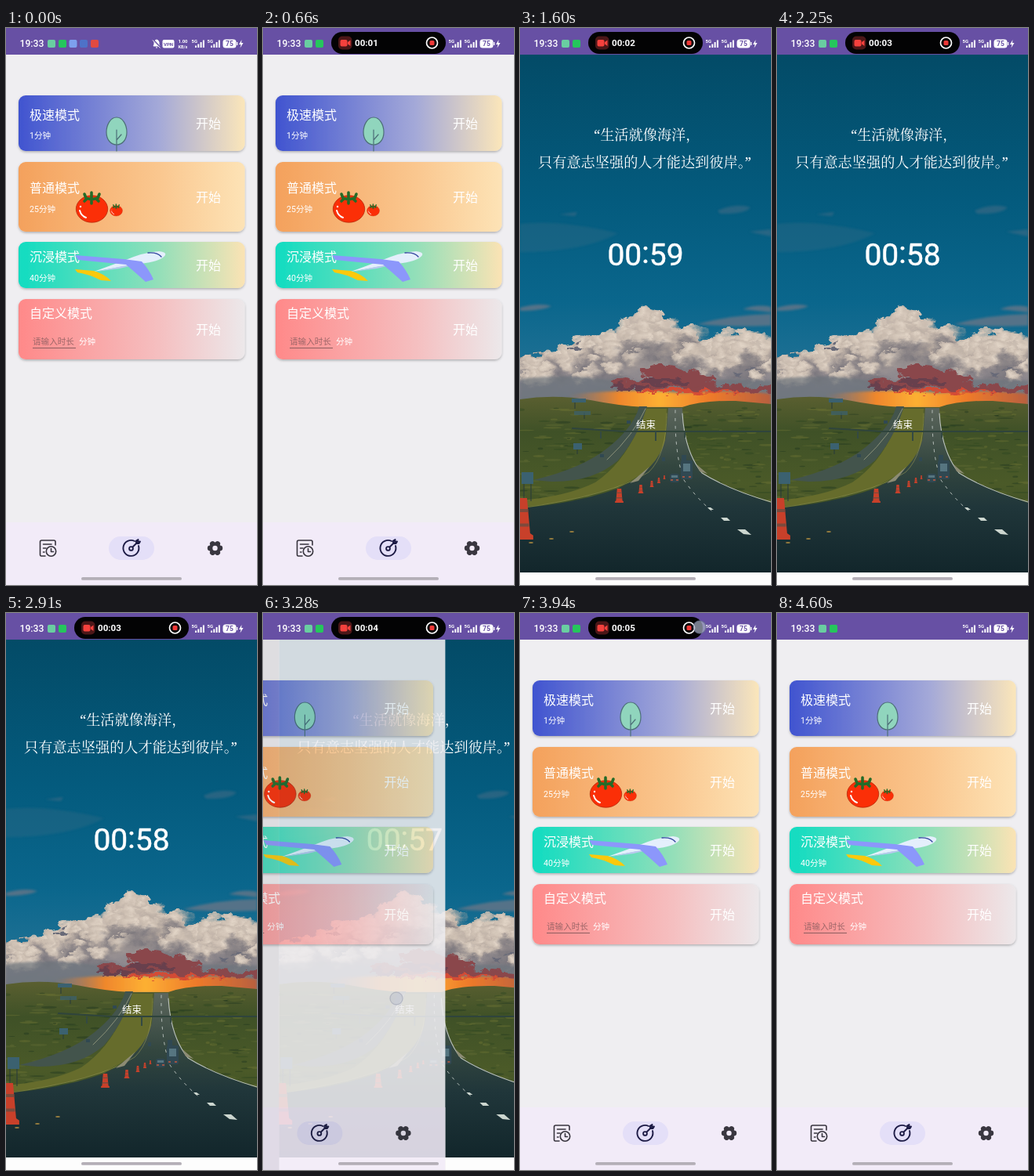
Recreate the animation shown at these times as an HTML page. Size 320 by 711 pixels, loop 4700 ms.

```html
<!DOCTYPE html>
<html lang="zh-CN">
<head>
<meta charset="utf-8">
<title>专注计时</title>
<style>
  html, body { margin: 0; width: 100%; height: 100%; overflow: hidden; background: #efeef1; }
  svg { display: block; width: 100vw; height: 100vh; }
  text { font-family: Roboto, "Noto Sans CJK SC", "Noto Sans CJK", sans-serif; fill: #fff; }
  .title { font-size: 16px; font-weight: 500; }
  .sub { font-size: 10.6px; }
  .quote { font-family: "Noto Serif", "Noto Serif CJK SC", "Noto Sans CJK SC", serif; font-size: 18.2px; font-weight: 300; }
  .tiny { font-size: 6px; font-weight: 700; }
  .line { fill: none; stroke-linecap: round; stroke-linejoin: round; }
</style>
</head>
<body>
<svg viewBox="0 0 320 711" preserveAspectRatio="none">
  <defs>
    <linearGradient id="sky" x1="0" y1="0" x2="0" y2="1">
      <stop offset="0" stop-color="#034b67"/><stop offset=".42" stop-color="#045b7e"/>
      <stop offset=".7" stop-color="#0a668c"/><stop offset="1" stop-color="#2b7799"/>
    </linearGradient>
    <linearGradient id="land" x1="0" y1="0" x2="0" y2="1">
      <stop offset="0" stop-color="#5a5f30"/><stop offset=".2" stop-color="#3f5127"/>
      <stop offset=".5" stop-color="#4b5a28"/><stop offset=".7" stop-color="#3b4d25"/>
      <stop offset="1" stop-color="#18302a"/>
    </linearGradient>
    <linearGradient id="road" x1="0" y1="0" x2="0" y2="1">
      <stop offset="0" stop-color="#5c665c"/><stop offset=".35" stop-color="#33463f"/>
      <stop offset=".6" stop-color="#20363a"/><stop offset="1" stop-color="#12262b"/>
    </linearGradient>
    <linearGradient id="glow" x1="0" y1="0" x2="1" y2="0">
      <stop offset="0" stop-color="#c9783e" stop-opacity="0"/><stop offset=".25" stop-color="#f0872c"/>
      <stop offset=".45" stop-color="#fdb033"/><stop offset=".7" stop-color="#ee7a2a"/>
      <stop offset="1" stop-color="#b8603f"/>
    </linearGradient>
    <linearGradient id="mass" x1="0" y1="0" x2="0" y2="1">
      <stop offset="0" stop-color="#d6c8bb"/><stop offset=".4" stop-color="#b4a69c"/>
      <stop offset=".75" stop-color="#84818a"/><stop offset="1" stop-color="#6f757f"/>
    </linearGradient>
    <radialGradient id="puff" cx=".4" cy=".3" r=".6">
      <stop offset="0" stop-color="#e2d5c7"/><stop offset=".5" stop-color="#cbbdb0" stop-opacity=".85"/>
      <stop offset="1" stop-color="#a89d98" stop-opacity="0"/>
    </radialGradient>
    <radialGradient id="shade">
      <stop offset="0" stop-color="#77737a" stop-opacity=".9"/><stop offset="1" stop-color="#817d82" stop-opacity="0"/>
    </radialGradient>
    <filter id="soft" x="-10%" y="-40%" width="120%" height="180%"><feGaussianBlur stdDeviation="1.6"/></filter>
    <filter id="rough" x="-5%" y="-20%" width="110%" height="140%">
      <feTurbulence type="fractalNoise" baseFrequency=".06 .09" numOctaves="4" seed="4"/>
      <feDisplacementMap in="SourceGraphic" scale="20" xChannelSelector="R" yChannelSelector="G"/>
    </filter>
    <filter id="drop" x="-5%" y="-10%" width="110%" height="130%">
      <feDropShadow dx="0" dy="1.5" stdDeviation="1.6" flood-color="#000" flood-opacity=".27"/>
    </filter>
    <clipPath id="page"><rect id="pageClip" width="320" height="711"/></clipPath>
  </defs>

  <rect width="320" height="711" fill="#60646a"/>

  <g id="home">
    <rect width="320" height="711" fill="#efeef1"/>
    <rect y="631" width="320" height="80" fill="#f2ebf8"/>
    <g id="cards"></g>

    <!-- tree -->
    <g stroke="#4d6f78" stroke-width="1.2" class="line">
      <path d="M141 114C149 114 154 124 154 133C154 143 148 149 141 149S128 143 128 133C128 124 133 114 141 114Z" fill="#90d5bd"/>
      <path d="M141 130V157M141 143L147 136"/>
    </g>

    <!-- tomatoes -->
    <g id="tomato">
      <ellipse cx="109.5" cy="231" rx="20.2" ry="17.2" fill="#fb2f07" stroke="#b52a0c" stroke-width=".8"/>
      <path d="M100 212L102 217L109 219L117 217L119 212M109 210V224M103 218L100 221M115 218L118 221" class="line" stroke="#246b28" stroke-width="3.600"/>
      <path d="M94 233Q96 240 102 242" class="line" stroke="#fff" stroke-width="2"/>
      <circle cx="95" cy="228" r="1.2" fill="#fff"/>
    </g>
    <use href="#tomato" transform="translate(97.5 142.5) scale(.393)"/>

    <!-- plane -->
    <path d="M88 308L112 310Q126 314 134 323L121 322Q105 314 91 312Z" fill="#fbc90c"/>
    <path d="M112 311L150 297Q176 286 195 285Q205 286 203 290Q198 297 178 300L145 305Z" fill="#e4effc"/>
    <path d="M115 311L148 304L178 299L145 307Z" fill="#b9c9ee"/>
    <path d="M88 290L150 295L173 298Q183 309 188 321L178 324Q166 313 153 302L92 296Z" fill="#8c97fb"/>
    <path d="M181 287Q193 286 198 292" class="line" stroke="#34489f" stroke-width="1.4"/>

    <!-- navigation -->
    <g class="line" stroke="#37343d" stroke-width="1.6">
      <path d="M50 674H45Q43.500 674 43.500 672V656Q43.500 654 45.500 654H61Q63 654 63 656V660M47.500 659H58M47.500 664H51M47.500 669H49"/>
      <circle cx="57.500" cy="668" r="6.200"/><path d="M57.500 664.500V668.500H60.500"/>
    </g>
    <rect x="131" y="649" width="58" height="30" rx="15" fill="#e4dff8"/>
    <g class="line" stroke="#1d1b45" stroke-width="1.9">
      <path d="M164 655A10 10 0 1 0 169 661"/>
      <circle cx="159.500" cy="664.500" r="2.400"/><path d="M161.500 662.500L168 656M166 654.500V658H169.500L171 655.500L168 656L168.500 653Z"/>
    </g>
    <g id="gear" transform="translate(266.5 664)"></g>
  </g>

  <g id="focus">
    <g clip-path="url(#page)">
      <rect width="320" height="711" fill="#fdfdfd"/>
      <rect width="320" height="34" fill="#6750a4"/>
      <rect y="34" width="320" height="450" fill="url(#sky)"/>
      <g filter="url(#soft)" fill="#5d7488">
        <path d="M0 250Q50 244 125 262Q80 286 0 286Z" opacity=".2"/>
        <path d="M252 233Q275 223 294 229Q286 238 255 237ZM292 260L320 257V266ZM50 238L73 235L70 240Z" opacity=".4"/>
        <path d="M0 357Q25 350 40 355Q27 361 0 361ZM226 378Q270 366 320 365V380Q270 382 226 378ZM284 359Q302 352 320 356V363Z" opacity=".9"/>
      </g>
      <g id="clouds" filter="url(#rough)"></g>
      <path d="M0 448Q70 440 130 452Q230 446 320 450V486H0Z" fill="#6d747d" opacity=".7" filter="url(#soft)"/>
      <path d="M62 468Q150 459 205 466Q270 461 320 467V485H62Z" fill="url(#glow)" filter="url(#soft)"/>
      <g filter="url(#rough)">
        <g fill="#8a474b"><ellipse cx="182" cy="440" rx="26" ry="9"/><ellipse cx="212" cy="450" rx="38" ry="9"/><ellipse cx="160" cy="455" rx="40" ry="7"/><ellipse cx="262" cy="460" rx="52" ry="5"/><ellipse cx="308" cy="462" rx="24" ry="5"/></g>
        <g fill="#683f4d"><ellipse cx="185" cy="452" rx="32" ry="4"/><ellipse cx="140" cy="459" rx="26" ry="3"/></g>
        <path d="M150 463Q215 457 290 465Q230 466 150 466Z" fill="#d44c34"/>
        <path d="M60 407Q73 400 82 407Q74 412 60 409ZM268 443L284 440L281 447ZM286 435L303 433L299 438Z" fill="#686b78"/>
      </g>
      <path d="M0 474Q45 467 90 475Q125 482 158 484H207Q232 475 275 476L320 480V695H0Z" fill="url(#land)"/>
      <g id="tufts"></g>
      <path d="M160 486H187L185 530Q174 566 121 587Q60 606 0 612V603Q60 598 96 580Q140 550 160 486Z" fill="#666c2c"/>
      <path d="M152 483H162Q151 521 125 552Q93 580 40 579L17 577Q80 562 113 535Q145 509 152 483Z" fill="#43544c"/>
      <path d="M160 486Q146 518 111 551" class="line" stroke="#8b9179"/>
      <path d="M189 485H207Q208 535 231 567Q265 588 320 606V695H0V613Q70 607 124 588Q176 565 186 523Z" fill="url(#road)"/>
      <path d="M187 492Q187 545 164 567Q117 597 0 613" class="line" stroke="#a5a258" opacity=".5"/>
      <path d="M207 492Q210 541 232 568Q265 589 320 605" class="line" stroke="#bcc3bb" stroke-width="1.1"/>
      <path d="M198 488Q197 544 209 577Q225 600 244 616" class="line" stroke="#bac2bd" stroke-dasharray="3 7"/>
      <path d="M239 612l4 0 4 3-5 0ZM256 625l8 0 4 4-8 0ZM277 640l10 0 8 7-10-1Z" fill="#ccd6cf"/>
      <path d="M67 511L135 515H320" class="line" stroke="#2f443c" stroke-width="2"/>
      <path d="M103 515V524M173 515V527M210 515V523" stroke="#344942" stroke-width="2"/>
      <path d="M225 557L239 569L229 566ZM165 560L140 581L151 578Z" fill="#8d8c74"/>
      <g fill="#304852">
        <rect x="205" y="552" width="15" height="24" rx="2"/><rect x="191" y="569" width="12" height="11" rx="3"/>
        <rect x="206" y="545" width="6" height="7"/><rect x="181" y="548" width="4" height="5"/>
        <rect x="136" y="501" width="5" height="4"/><rect x="102" y="544" width="5" height="4"/>
      </g>
      <path d="M208 556H217V566H208ZM193 571H201V574H193Z" fill="#567580"/>
      <path d="M207 573h3M215 573h3M192 577h3M199 577h3" stroke="#c25a40" stroke-width="1.5"/>
      <path d="M5 572V615M14 572V604M70 478V486M82 491V499M73 536V544" stroke="#26383b"/>
      <g fill="#3b6170"><rect x="2" y="567" width="15" height="15"/><rect x="66" y="473" width="18" height="5"/><rect x="69" y="489" width="21" height="5" opacity=".7"/><rect x="68" y="530" width="11" height="8"/></g>
      <g id="cones"></g>
      <g fill="#c59a42" opacity=".75"><ellipse cx="66" cy="643" rx="3" ry="1"/><ellipse cx="40" cy="652" rx="3" ry="1"/><ellipse cx="14" cy="657" rx="3" ry="1"/></g>
      <text class="quote" x="94" y="143">“生活就像海洋，</text>
      <text class="quote" x="23" y="178">只有意志坚强的人才能达到彼岸。”</text>
      <text x="160" y="303" text-anchor="middle" font-size="39" stroke="#fff" stroke-width=".5">00<tspan dy="-3">:</tspan><tspan id="count" dy="3"></tspan></text>
      <text x="160.500" y="511" text-anchor="middle" font-size="12.500" font-weight="500">结束</text>
    </g>
  </g>

  <g id="bar">
    <rect width="320" height="34" fill="#6750a4"/>
    <text x="17.500" y="24.300" font-size="12.200" font-weight="500">19:33</text>
    <rect x="53" y="15" width="10" height="10" rx="2" fill="#69cea1"/>
    <rect x="67" y="15" width="10" height="10" rx="2" fill="#25c65c"/>
    <g id="extras">
      <rect x="80.500" y="15" width="10" height="10" rx="2" fill="#7da0ee"/>
      <rect x="94" y="15" width="10" height="10" rx="2" fill="#4e72c8"/>
      <rect x="108" y="15" width="10" height="10" rx="2" fill="#e24a40"/>
      <path d="M188 23H196L195 21V18Q194 15 192 15T189 18V21ZM191 25H193" fill="#fff" stroke="#fff"/>
      <path d="M187.500 15L197 25" stroke="#6750a4" stroke-width="2"/><path d="M187 15.500L196.500 25.500" stroke="#fff"/>
      <rect x="199.500" y="15" width="15" height="10.500" rx="2" fill="#fff"/>
      <text x="207" y="22.600" text-anchor="middle" class="tiny" style="fill:#6750a4">VPN</text>
      <text x="225.500" y="19" text-anchor="middle" class="tiny">1.00</text>
      <text x="225.500" y="25.500" text-anchor="middle" class="tiny" style="font-size:5.500px">KB/s</text>
    </g>
    <g id="signal">
      <text x="236.500" y="18.500" class="tiny">5G</text>
      <path d="M242 25V22.500M245.300 25V20.500M248.600 25V18M251.900 25V15.500" stroke="#fff" stroke-width="2"/>
    </g>
    <use href="#signal" x="20"/>
    <rect x="276.500" y="14.500" width="17" height="11" rx="3.500" fill="#fff"/>
    <rect x="294" y="18" width="1.300" height="4" fill="#fff"/>
    <text x="285" y="23.200" text-anchor="middle" font-size="8.500" font-weight="600" style="fill:#6750a4">75</text>
    <path d="M300.500 15L297 21H299.500L298.500 25.500L302.500 19H300Z" fill="#fff"/>
    <rect id="pill" y="5" height="28" rx="14" fill="#030304"/>
    <g id="rec">
      <rect x="96" y="10.500" width="17.500" height="17" rx="5" fill="#4c1718"/>
      <rect x="98.500" y="15" width="9" height="8.500" rx="2" fill="#f4413d"/><path d="M108 18L111.500 15.500V23L108 20.500Z" fill="#f4413d"/>
      <text id="recTime" x="117" y="23.300" font-size="11.600" font-weight="600"></text>
      <circle cx="215.500" cy="19" r="7" fill="none" stroke="#fff" stroke-width="1.700"/>
      <rect x="212.500" y="16" width="6" height="6" rx="1.500" fill="#ef3937"/>
    </g>
  </g>
  <rect x="96" y="701" width="128" height="3.800" rx="1.900" fill="#b4afb7"/>
  <circle id="touch" r="8" fill="#a9b0c4" fill-opacity=".7" stroke="#68718f" stroke-opacity=".7" stroke-width="1.300"/>
</svg>

<script>
const LOOP = 4700, STEP = 93.75, SECOND = 850, SLIDE = 400;
const OPEN = 1200, BACK = 3141, DRIFT = 28;
const $ = id => document.getElementById(id);
const clamp = v => Math.max(0, Math.min(1, v));
const easeOut = v => 1 - (1 - clamp(v)) ** 3;
const pad = s => String(s).padStart(2, '0');
const show = (node, on) => node.style.display = on ? '' : 'none';

let seed = 17;
const rnd = () => (seed = seed * 16807 % 2147483647) / 2147483647;

function drawCards() {
  const list = [
    [86, 71, '极速模式', 116.5, '1分钟', 122, '#4054d0', '#a4a9d8', '#fbe6ba'],
    [171, 89, '普通模式', 210, '25分钟', 216, '#f4a15c', '#fac78f', '#fde3b6'],
    [273, 59, '沉浸模式', 298, '40分钟', 303, '#10dcc1', '#93dfb9', '#fbe3b4'],
    [346, 77, '自定义模式', 370, '', 385, '#ff8989', '#f5bfc0', '#ece8ea']
  ];
  $('cards').innerHTML = list.map(([y, h, name, base, sub, mid, a, b, c], i) => `
    <linearGradient id="card${i}"><stop stop-color="${a}"/><stop offset=".62" stop-color="${b}"/><stop offset="1" stop-color="${c}"/></linearGradient>
    <rect x="16" y="${y}" width="288.500" height="${h}" rx="9" fill="url(#card${i})" filter="url(#drop)"/>
    <text class="title" x="30" y="${base}">${name}</text>
    <text class="sub" x="30" y="${base + 24.8}">${sub}</text>
    <text class="title" x="242" y="${mid + 6}">开始</text>`).join('') + `
    <text class="sub" x="34" y="403.500" style="fill:#9c6668">请输入时长</text>
    <path d="M34 408.500H89" stroke="#8b5e60"/>
    <text class="sub" x="93" y="403.500">分钟</text>`;
}

function drawGear() {
  let teeth = '';
  for (let i = 0; i < 6; i++) teeth += `<circle cx="0" cy="-6.300" r="3.400" transform="rotate(${i * 60 + 30})"/>`;
  $('gear').innerHTML = `<g fill="#3a3740">${teeth}<circle r="7.400"/></g><circle r="3.200" fill="#f2ebf8"/>`;
}

function drawClouds() {
  const ridge = [[-15, 424], [20, 416], [50, 412], [62, 401], [95, 395], [125, 387], [136, 369], [150, 362], [180, 361], [194, 378], [222, 380], [232, 399], [256, 390], [290, 386], [335, 409]];
  const top = x => {
    const i = ridge.findIndex(p => p[0] > x), [a, b] = [ridge[i - 1], ridge[i]];
    return a[1] + (b[1] - a[1]) * (x - a[0]) / (b[0] - a[0]);
  };
  let out = `<path d="M${ridge.join('L')}V485H-15Z" fill="url(#mass)"/>`;
  for (let row = 0; row < 5; row++)
    for (let x = -8; x < 328; x += 14) {
      const r = 7 + rnd() * 8, dark = rnd() < row * .2, px = x + rnd() * 7;
      const y = top(px) + r * .7 + row * 12 + rnd() * 5;
      if (y < 450) out += `<ellipse cx="${px}" cy="${y}" rx="${r * 1.5}" ry="${r}" fill="url(#${dark ? 'shade' : 'puff'})"/>`;
    }
  $('clouds').innerHTML = out;
}

function drawGround() {
  const greens = ['#22381f', '#2f4722', '#6d7434', '#5f6a33'];
  let out = '';
  for (let i = 0; i < 260; i++) {
    const y = 485 + rnd() * 118, x = rnd() * 320;
    out += `<ellipse cx="${x}" cy="${y}" rx="${2 + rnd() * 11}" ry="${.5 + rnd() * 1.2}" fill="${greens[rnd() * 4 | 0]}" opacity=".45"/>`;
  }
  $('tufts').innerHTML = out;
  const cones = [[1, 653, 53], [126.500, 606, 18], [154, 594, 11], [168, 586, 8], [177, 581, 7], [184, 576, 5]];
  $('cones').innerHTML = cones.map(([x, y, h]) => `<g transform="translate(${x} ${y}) scale(${h / 20})">
    <path d="M-6 0H6V-2L4.500-3L3-20H-3L-4.500-3L-6-2Z" fill="#c8402a"/>
    <path d="M-4-7H4M-3.500-14H3.500" stroke="#7d4a3c" stroke-width="1.500"/></g>`).join('');
}

function place(t) {
  const back = t >= BACK;
  const p = easeOut((t - (back ? BACK : OPEN)) / SLIDE);
  const home = $('home'), focus = $('focus');
  const homeX = back ? 320 * (p - 1) : -DRIFT * 1.1 * p;
  const focusX = back ? DRIFT * p : 320 * (1 - p);
  home.setAttribute('transform', `translate(${homeX} 0)`);
  home.setAttribute('opacity', back ? .55 + .45 * p : 1);
  focus.setAttribute('transform', `translate(${focusX} 0)`);
  show(focus, t >= OPEN && !(back && p === 1));
  show(home, back || p < 1);
  $('pageClip').setAttribute('rx', !back && p < .99 ? 18 : 0);
  // The page that is arriving lies on top.
  const [under, over] = back ? [focus, home] : [home, focus];
  if (under.nextElementSibling !== over) over.parentNode.insertBefore(under, over);
}

function island(t) {
  const open = easeOut((t - 100) / 300) - easeOut((t - 4030) / 280);
  const w = 28 + 118 * open;
  $('pill').setAttribute('x', 160 - w / 2);
  $('pill').setAttribute('width', w);
  show($('pill'), open > .01);
  show($('rec'), open > .9);
  show($('extras'), t < 90);
  $('recTime').textContent = '00:' + pad(Math.floor((t + 400) / SECOND));
}

function touch(t) {
  const taps = [[840, 1170, 260, 124], [2990, 3330, 170, 492], [3840, 4070, 229, 18]];
  const tap = taps.find(([from, to]) => t >= from && t < to);
  show($('touch'), tap);
  if (!tap) return;
  $('touch').setAttribute('transform', `translate(${tap[2]} ${tap[3]})`);
  $('touch').setAttribute('opacity', clamp((tap[1] - t) / 110));
}

function render(time) {
  const t = Math.min(49, Math.floor((time % LOOP + 5) / STEP)) * STEP;
  place(t);
  island(t);
  touch(t);
  $('count').textContent = pad(59 - Math.max(0, Math.floor((t - 1340) / SECOND)));
}

drawCards();
drawGear();
drawClouds();
drawGround();
const start = performance.now();
function tick() {
  render(performance.now() - start);
  requestAnimationFrame(tick);
}
tick();
</script>
</body>
</html>
```
